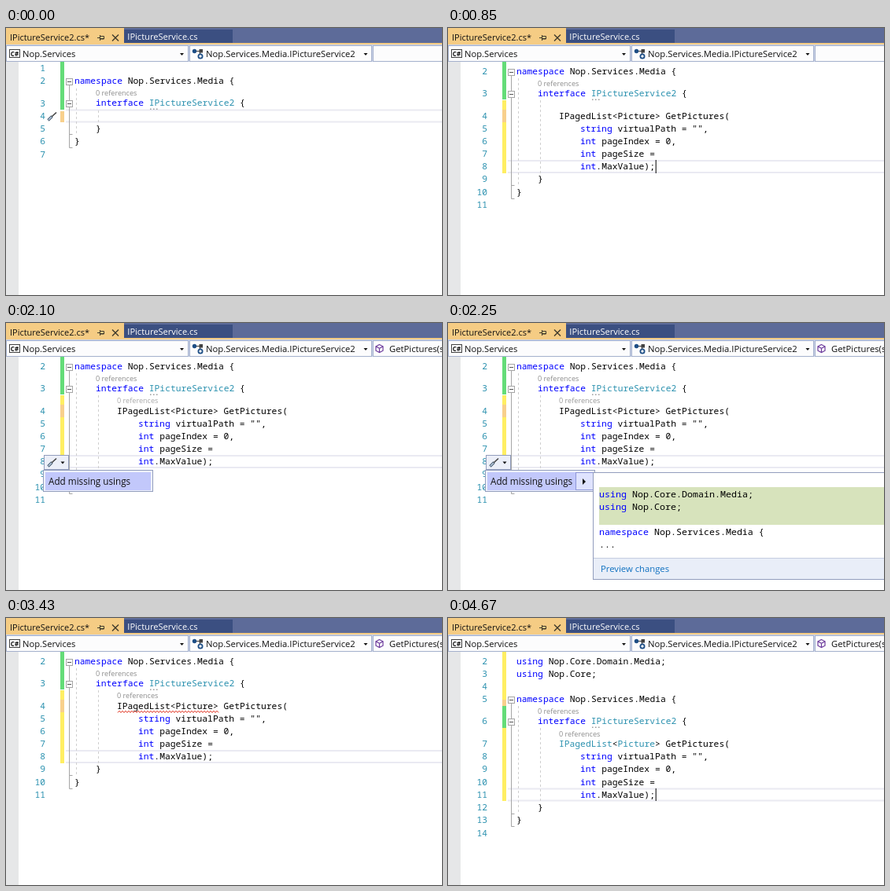
These frames come from a looping animation (554 px wide and 340 px high, 4.9 s). An HTML page:

```html
<!DOCTYPE html>
<html lang="en">
<head>
<meta charset="utf-8">
<title>Add missing usings</title>
<style>
  html, body { margin: 0; width: 100%; height: 100%; overflow: hidden; background: #fff; }
  svg { display: block; width: 554px; height: 340px; }
  text { white-space: pre; }
  .code { font: 11.31px "Noto Sans Mono", "DejaVu Sans Mono", monospace; }
  .ui { font-family: "Open Sans", "Noto Sans", sans-serif; }
</style>
</head>
<body>
<svg id="stage" viewBox="0 0 554 340"></svg>
<script>
const LOOP = 4900;
const NS = "http://www.w3.org/2000/svg";
const stage = document.getElementById("stage");
const INK = "#111", TEAL = "#2b91af", GREEN = "#64dc78", YELLOW = "#ffee62", ORANGE = "#f8d08c";

function el(parent, tag, attrs = {}, text) {
  const node = document.createElementNS(NS, tag);
  for (const k in attrs) node.setAttribute(k, attrs[k]);
  if (text !== undefined) node.textContent = text;
  return parent.appendChild(node);
}
const group = (parent = stage) => el(parent, "g");
const rect = (g, x, y, width, height, fill, stroke) =>
  el(g, "rect", { x, y, width, height, fill, ...(stroke && { stroke }) });
const path = (g, d, stroke, width = 1, fill = "none") =>
  el(g, "path", { d, stroke, "stroke-width": width, fill });
const label = (g, x, y, text, size = 11.2, fill = INK) =>
  el(g, "text", { x, y, class: "ui", "font-size": size, fill }, text);
const arrow = (g, x, y) => path(g, `M${x} ${y}h5l-2.5 3z`, "none", 0, INK);

// One line of C#, coloured by token.
function code(g, x, y, line, types = "IPictureService2", size) {
  const t = el(g, "text", { x, y, class: "code", fill: "#000" });
  if (size) t.style.fontSize = size + "px";
  const known = types.split(" ");
  for (const word of line.match(/\w+|\W+/g)) {
    const fill = /^(namespace|interface|string|int|using)$/.test(word) ? "#0000ff"
      : known.includes(word) ? TEAL : "#000";
    el(t, "tspan", { fill }, word);
  }
  return t;
}

function lineNumbers(g, first, centers) {
  centers.forEach((y, i) => el(g, "text",
    { x: 50, y: y + 4, class: "code", fill: TEAL, "text-anchor": "end" }, first + i));
}

function folds(g, top, inner, endInner, endOuter) {
  path(g, `M80.5 ${top}V${endOuter + .5}h4M80.5 ${endInner + .5}h4`, "#a5a5a5");
  for (const y of [top, inner]) {
    rect(g, 76.5, y - 3.5, 8, 8, "#fff", "#a5a5a5");
    path(g, `M78 ${y + .5}h5`, "#555");
  }
}

function guide(g, x, from, to) {
  path(g, `M${x + .5} ${from}V${to}`, "#cfcfcf").setAttribute("stroke-dasharray", "3 3");
}

const margin = (g, ...bars) => bars.forEach(([from, to, fill]) => rect(g, 69, from, 5, to - from, fill));
const lens = (g, x, y) => label(g, x, y, "0 references", 9.1, "#8c8c8c");
const dots = (g, y) => [183, 187, 191].forEach(x => rect(g, x, y, 1.5, 1.5, "#9a9a9a"));
const caret = (x, y, h) => rect(stage, x, y, 1, h, "#000");

function currentLine(g, y) {
  path(g, `M76 ${y + 1}H554M76 ${y + 16}H554`, "#eaeaf2", 2);
}

function squiggle(y) {
  const g = group();
  let d = `M142 ${y + 3}`;
  for (let x = 144, up = true; x <= 270; x += 2, up = !up) d += `L${x} ${up ? y + .7 : y + 3}`;
  path(g, d, "#e0301e");
  return g;
}

function screwdriver(g, x, y) {
  path(g, `M${x + 1.5} ${y + 11.5}l5 -5`, "#42586e", 3.2);
  path(g, `M${x + 2} ${y + 11}l4 -4`, "#c8d8ea", 1.2);
  path(g, `M${x + 6} ${y + 7}l6 -5.5`, "#424242", 1.6);
}

function signature(g, y, step) {
  ['string virtualPath = "",', "int pageIndex = 0,", "int pageSize =", "int.MaxValue);"]
    .forEach((line, i) => code(g, 168, y + Math.round(i * step), line));
}

function interfaceHead(g, top, inner) {
  code(g, 87, top + 4, "namespace Nop.Services.Media {");
  code(g, 114, inner + 4, "interface IPictureService2 {");
  lens(g, 114, inner - 9);
  dots(g, inner + 7.5);
}

function header() {
  const g = group();
  rect(g, 0, 0, 554, 19, "#5d6b99");
  rect(g, 150, 2, 138, 17, "#3b4f81");
  rect(g, 0, 0, 150, 21, "#f5cc84");
  rect(g, 0, 19, 554, 2, "#f5cc84");
  label(g, 5, 16, "IPictureService2.cs*", 11);
  label(g, 154.3, 14.5, "IPictureService.cs", 11.1, "#fff");
  path(g, "M116 12.5h3.5M119.5 9v7M119.5 10.5h5v3.5h-5M119.5 13.5h5", "#3f3a2c");
  path(g, "M135 8.5l8 8M143 8.5l-8 8", "#3f3a2c", 1.4);

  rect(g, 0, 21, 554, 22, "#ccd5ea");
  for (const [x, w] of [[0, 232], [233, 232], [466, 90]]) rect(g, x + .5, 22.5, w - 1, 20, "#fcfcfd", "#a4b0cc");
  rect(g, 4.5, 27.5, 13, 10, "#fff", "#424242");
  label(g, 5.8, 35.5, "C#", 8).setAttribute("font-weight", 700);
  label(g, 21, 37, "Nop.Services");
  arrow(g, 221, 32);
  path(g, "M240 29.5h7M246.5 30v4", "#424242", 1.2);
  el(g, "circle", { cx: 239.5, cy: 29.5, r: 2.7, fill: "#1e4f86" });
  rect(g, 245.5, 27, 4.5, 4.5, "#424242");
  el(g, "circle", { cx: 247, cy: 36, r: 2.6, fill: "#fff", stroke: "#1e4f86", "stroke-width": 1.8 });
  label(g, 254, 37, "Nop.Services.Media.IPictureService2", 11.28);
  arrow(g, 454.5, 32);
  rect(g, 0, 43, 16, 297, "#e6e7e8");
}

function emptyFile() {
  const g = group();
  currentLine(g, 103.5);
  margin(g, [43, 104, GREEN], [106, 120, ORANGE]);
  lineNumbers(g, 1, [51, 67, 96, 112, 128, 144, 161]);
  folds(g, 68, 96, 135, 152);
  guide(g, 89, 77, 136);
  guide(g, 117, 105, 121);
  interfaceHead(g, 67, 95);
  code(g, 114, 132, "}");
  code(g, 87, 148, "}");
  screwdriver(g, 52, 106);
  return g;
}

function pastedFile() {
  const g = group();
  currentLine(g, 168);
  margin(g, [43, 91, GREEN], [92, 185, YELLOW], [104, 120, ORANGE]);
  lineNumbers(g, 2, [55, 83, 112, 128, 144, 160, 176, 192, 209, 225]);
  folds(g, 56, 84, 200, 217);
  guide(g, 89, 64, 200);
  guide(g, 117, 92, 185);
  interfaceHead(g, 55, 83);
  code(g, 141, 116, "IPagedList<Picture> GetPictures(");
  signature(g, 132, 16);
  code(g, 114, 196, "}");
  code(g, 87, 213, "}");
  return g;
}

function fixedFile() {
  const g = group();
  currentLine(g, 216.5);
  margin(g, [43, 104, YELLOW], [104, 112, ORANGE], [112, 140, GREEN], [140, 233, YELLOW]);
  lineNumbers(g, 2, [55, 71, 87, 103, 131, 160, 176, 192, 209, 225, 241, 257, 274]);
  folds(g, 104, 132, 249, 265);
  guide(g, 89, 112, 249);
  guide(g, 117, 140, 233);
  code(g, 87, 59, "using Nop.Core.Domain.Media;");
  code(g, 87, 75, "using Nop.Core;");
  interfaceHead(g, 103, 131);
  lens(g, 141, 150.5);
  signature(g, 180, 16.3);
  code(g, 114, 245, "}");
  code(g, 87, 261, "}");
  return g;
}

function memberCombo() {
  const g = group();
  path(g, "M474.5 27.5l4.5 2.3v5.4l-4.5 2.3l-4.5 -2.3v-5.4zM470 29.8l4.5 2.4l4.5 -2.4M474.5 32.2v5.3", "#6c3a9c", 1.2);
  label(g, 487, 37, "GetPictures(string virtualPath", 11.3);
  return g;
}

function fixButton() {
  const g = group();
  rect(g, 48.5, 168.5, 31, 18, "#eceff8", "#929dbd");
  screwdriver(g, 52, 171);
  arrow(g, 69.5, 176.5);
  return g;
}

function fixMenu() {
  const g = group();
  rect(g, 47.5, 187.5, 139, 27, "#eef1fa", "#929dbd");
  rect(g, 50, 190, 134, 23, "#c2c8fb");
  label(g, 54, 206, "Add missing usings", 11.7);
  return g;
}

function preview() {
  const g = group();
  rect(g, 162.5, 190.5, 22, 22, "#dfe3ff", "#8f97d8");
  path(g, "M171 198v8l4 -4z", "none", 0, INK);
  rect(g, 184.5, 190.5, 372, 136, "#fff", "#929dbd");
  rect(g, 192, 209, 362, 48, "#d7e3bc");
  rect(g, 185, 299, 369, 27, "#e9eef8");
  path(g, "M185 299.5H554", "#c5cde0");
  [["using Nop.Core.Domain.Media;", 222], ["using Nop.Core;", 238],
   ["namespace Nop.Services.Media {", 270], ["...", 286]]
    .forEach(([line, y]) => code(g, 192, y, line, "", 11.67));
  label(g, 194, 317, "Preview changes", 11.3, "#0e70c0");
  return g;
}

header();

// Each part with its [start, end, opacity] spans.
const parts = [
  [emptyFile(), [0, 850]],
  [pastedFile(), [850, 3510]],
  [fixedFile(), [3510, LOOP]],
  [code(stage, 141, 164, "IPagedList<Picture> GetPictures("), [3510, 4270]],
  [code(stage, 141, 164, "IPagedList<Picture> GetPictures(", "IPagedList Picture"), [4270, LOOP]],
  [memberCombo(), [1390, LOOP]],
  [lens(stage, 141, 102), [1790, 2250, .75], [2250, 2420, .9], [2420, 3510]],
  [squiggle(117.5), [2570, 3510]],
  [squiggle(165.5), [3510, 4270]],
  [caret(86.5, 104, 16), [460, 850]],
  [caret(263.7, 168, 17), [850, 1390], [1790, 1960]],
  [caret(263.7, 217, 16), [3580, 4120], [4670, LOOP]],
  [fixButton(), [1960, 3430]],
  [fixMenu(), [2030, 3430]],
  [preview(), [2250, 3430]]
];

function draw(now) {
  const t = now % LOOP;
  for (const [node, ...spans] of parts) {
    const span = spans.find(([from, to]) => t >= from && t < to);
    node.style.display = span ? "" : "none";
    if (span) node.style.opacity = span[2] ?? 1;
  }
}

const start = performance.now();
function tick() {
  draw(performance.now() - start);
  requestAnimationFrame(tick);
}
tick();
</script>
</body>
</html>
```
